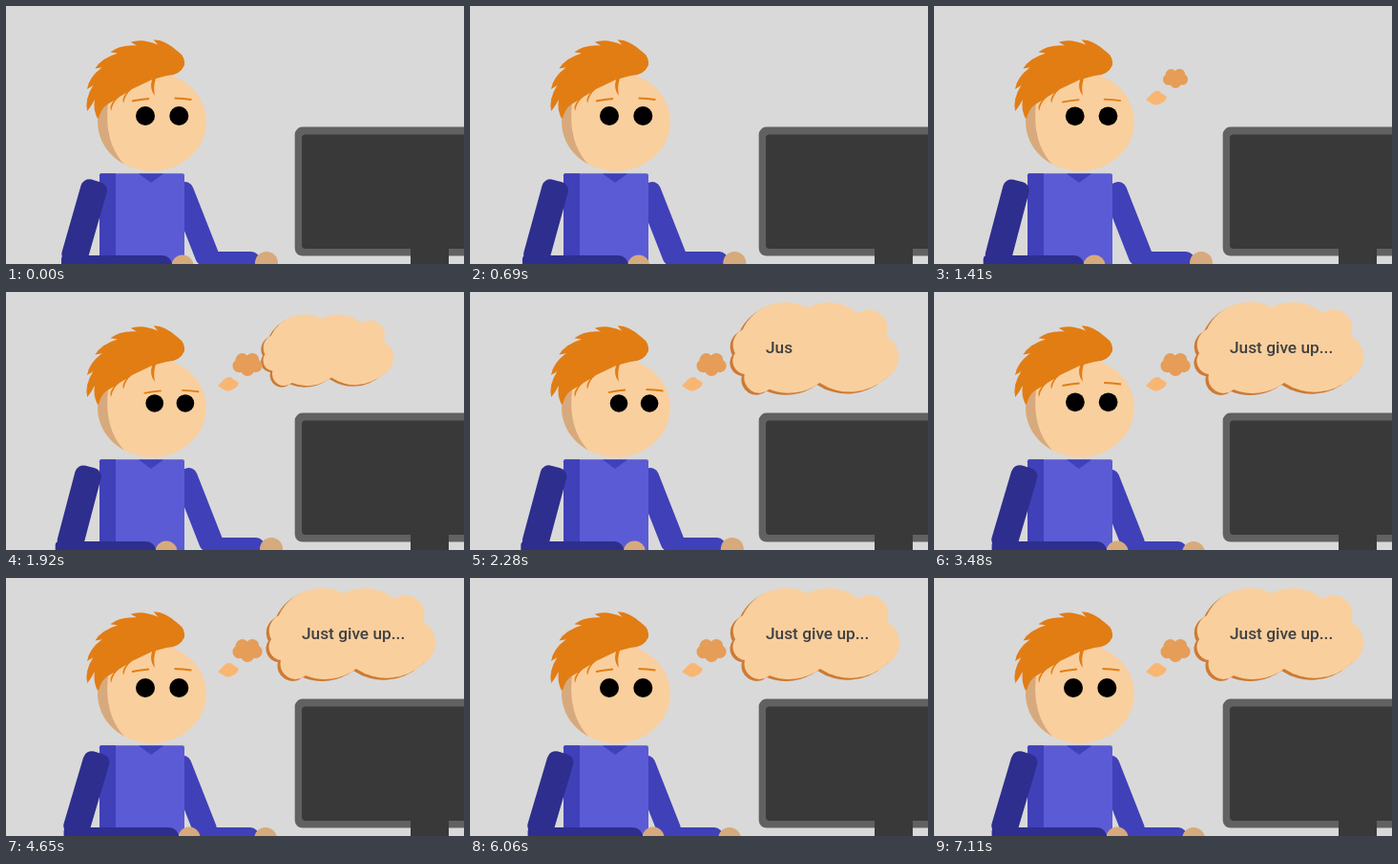
An HTML page with a canvas that plays this animation: 480x270 px, repeating every 7.68 s.

```html
<!DOCTYPE html>
<html lang="en">
<head>
<meta charset="utf-8">
<title>Just give up</title>
<style>
  html, body { margin: 0; width: 100%; height: 100%; overflow: hidden; background: #d9d9d9; }
  canvas { display: block; width: 100%; height: 100%; }
</style>
</head>
<body>
<canvas id="stage" width="480" height="270"></canvas>
<script>
const ctx = document.getElementById('stage').getContext('2d');
const LOOP = 7680, STEP = 30;
const CAPTION = 'Just give up...';
const SKIN = '#f9cf9e', TAN = '#d6aa7c', HAIR = '#e27d14';
const BLUE = '#5b5bd6', MID_BLUE = '#4040b8', DARK_BLUE = '#2e2e8e';

const progress = (t, start, duration) => Math.min(1, Math.max(0, (t - start) / duration));
const easeOut = (...span) => 1 - (1 - progress(...span)) ** 2;
const easeInOut = (...span) => {
  const p = progress(...span);
  return p * p * (3 - 2 * p);
};

function fill(color, path) {
  ctx.fillStyle = color;
  ctx.fill(path);
}

function box(color, x, y, w, h, radius = 0) {
  const path = new Path2D();
  path.roundRect(x, y, w, h, radius);
  fill(color, path);
}

function disc(color, x, y, r) {
  const path = new Path2D();
  path.arc(x, y, r, 0, 2 * Math.PI);
  fill(color, path);
}

// Runs a drawing with its origin moved to x, y.
function at(x, y, scale, degrees, paint) {
  ctx.save();
  ctx.translate(x, y);
  ctx.rotate(degrees * Math.PI / 180);
  ctx.scale(scale, scale);
  paint();
  ctx.restore();
}

// Swept-back tufts around the skull, a forelock, then a fringe of small spikes.
function makeHair() {
  const path = new Path2D();
  const rim = (degrees, r) => {
    const a = degrees * Math.PI / 180;
    return [150 - 66 * r * Math.sin(a), 98 - 63 * r * Math.cos(a)];
  };
  path.moveTo(96, 118);
  path.quadraticCurveTo(91, 108, 93, 98);
  for (let angle = 101; angle > -10; angle -= 21) {
    path.quadraticCurveTo(...rim(angle - 4, 0.93), ...rim(angle, 1));
    path.quadraticCurveTo(...rim(angle - 11, 1.03), ...rim(angle - 26, 0.92));
  }
  path.quadraticCurveTo(188, 53, 187, 62);
  path.quadraticCurveTo(182, 73, 168, 73);
  path.lineTo(157, 76);
  path.quadraticCurveTo(154, 84, 156, 94);
  path.quadraticCurveTo(150, 87, 153, 77);
  for (let i = 0; i < 3; i++) {
    const x = 132 - 13 * i, y = 87 + 8 * i;
    path.lineTo(x, y);
    path.quadraticCurveTo(x - 7, y + 5, x - 9, y + 15);
    path.quadraticCurveTo(x - 11, y + 10, x - 6, y + 4);
  }
  return path;
}

function makePuff() {
  const path = new Path2D();
  for (let i = 0; i < 5; i++) {
    const a = 0.3 + i * 2 * Math.PI / 5;
    const x = 9 * Math.cos(a), y = 5.5 * Math.sin(a);
    path.moveTo(x + 7, y);
    path.arc(x, y, 7, 0, 2 * Math.PI);
  }
  return path;
}

const hair = makeHair(), puff = makePuff();
const cloud = new Path2D(`M288 86 A14 14 0 0 1 278 64 A18 18 0 0 1 286 39 A50 50 0 0 1 354 16
  A48 48 0 0 1 407 22 A20 20 0 0 1 437 46 A25 25 0 0 1 437 90 A57 57 0 0 1 367 95
  A54 54 0 0 1 314 102 A16 16 0 0 1 288 86 Z`);
const wisp = new Path2D('M-11 2 L-5 -4 Q1 -10 5 -5 L11 -1 Q9 5 4 6 Q-1 9 -5 6 Z');

function drawMonitor() {
  box('#616161', 302.7, 126.6, 200, 135, 8);
  box('#393939', 310, 134.6, 200, 119.4, 4);
  box('#393939', 424, 254, 40, 20);
}

function drawRightArm(t) {
  const reach = 7 * easeInOut(t, 0, 1200) - 8 * easeInOut(t, 1500, 1300);
  const drop = 4 * easeInOut(t, 2730, 700);
  const hand = 273 + reach, elbow = 0.8 * reach - 0.35 * drop, top = 257 + drop;
  at(181 + elbow, 186 + 0.4 * drop, 1, -21.5, () => box(MID_BLUE, -12.5, 0, 25, 90, 9));
  box(MID_BLUE, 204 + elbow, top, hand - 211 - elbow, 30, [0, 9, 9, 0]);
  disc(TAN, hand, top + 12, 12);
}

function drawTorso() {
  box(BLUE, 98, 175.3, 89, 100, 2);
  box(MID_BLUE, 98, 175.3, 17, 100, [2, 0, 0, 0]);
  fill(MID_BLUE, new Path2D('M139 175.5 H165 L152 185 Z'));
}

function drawLeftArm(t) {
  const reach = 24 * easeInOut(t, 1900, 1400) - 17 * easeInOut(t, 0, 1400);
  const hand = 185 + reach, elbow = 0.37 * reach;
  disc(TAN, hand, 272, 11.5);
  at(94.5 + elbow, 183, 1, 16 + 0.2 * elbow, () => box(DARK_BLUE, -14, 0, 28, 90, 9));
  box(DARK_BLUE, 58 + elbow, 261, hand - 69 - elbow, 26, [4, 10, 0, 0]);
}

function drawBrow(x, y, rise) {
  ctx.beginPath();
  ctx.moveTo(x, y);
  ctx.quadraticCurveTo(x + 9, y - rise / 2 - 0.5, x + 18, y - rise);
  ctx.stroke();
}

function drawHead(t) {
  const look = 10 * (easeInOut(t, 1200, 800) - easeInOut(t, 2400, 1500));
  const frown = 6.5 * easeInOut(t, 1200, 800) - 8 * easeInOut(t, 1950, 1500);
  const face = new Path2D();
  face.ellipse(153, 121, 57, 52, 0, 0, 2 * Math.PI);
  ctx.save();
  ctx.clip(face);
  fill(SKIN, face);
  fill(TAN, new Path2D('M90 80 L108 95 Q100 142 126 168 L90 180 Z'));
  ctx.restore();
  fill(HAIR, hair);

  const eyeY = 115 + 0.15 * look, eyeSize = 10 - 0.07 * look;
  disc('#000', 146 + look, eyeY, eyeSize);
  disc('#000', 181.3 + 0.68 * look, eyeY, eyeSize);
  ctx.strokeStyle = HAIR;
  ctx.lineWidth = 1.8;
  drawBrow(132 + 1.3 * look, 99.5 + frown, 2.5);
  drawBrow(176.5 + 0.8 * look, 96.5 + frown, -1.5);
}

function drawThought(t) {
  at(248, 70, easeOut(t, 1440, 900), 0, () => {
    ctx.translate(-251, -68);
    fill('#cc7a35', cloud);
    ctx.translate(3, -2);
    fill(SKIN, cloud);
  });
  at(233, 96, easeOut(t, 780, 400), 0, () => fill('#f9b672', wisp));
  at(253, 75.5, easeOut(t, 1110, 500), 0, () => fill('#e59d57', puff));

  const typed = Math.max(0, Math.ceil((t - 2120) / 74));
  ctx.fillStyle = '#404040';
  ctx.font = '500 17.3px Roboto, sans-serif';
  ctx.fillText(CAPTION.slice(0, typed), 310, 64);
}

function draw(t) {
  ctx.fillStyle = '#d9d9d9';
  ctx.fillRect(0, 0, 480, 270);
  drawMonitor();
  drawRightArm(t);
  drawTorso();
  drawLeftArm(t);
  drawHead(t);
  drawThought(t);
}

const start = performance.now();
function frame() {
  const elapsed = (performance.now() - start) % LOOP;
  draw(Math.floor(elapsed / STEP) * STEP);
  requestAnimationFrame(frame);
}
frame();
</script>
</body>
</html>
```
